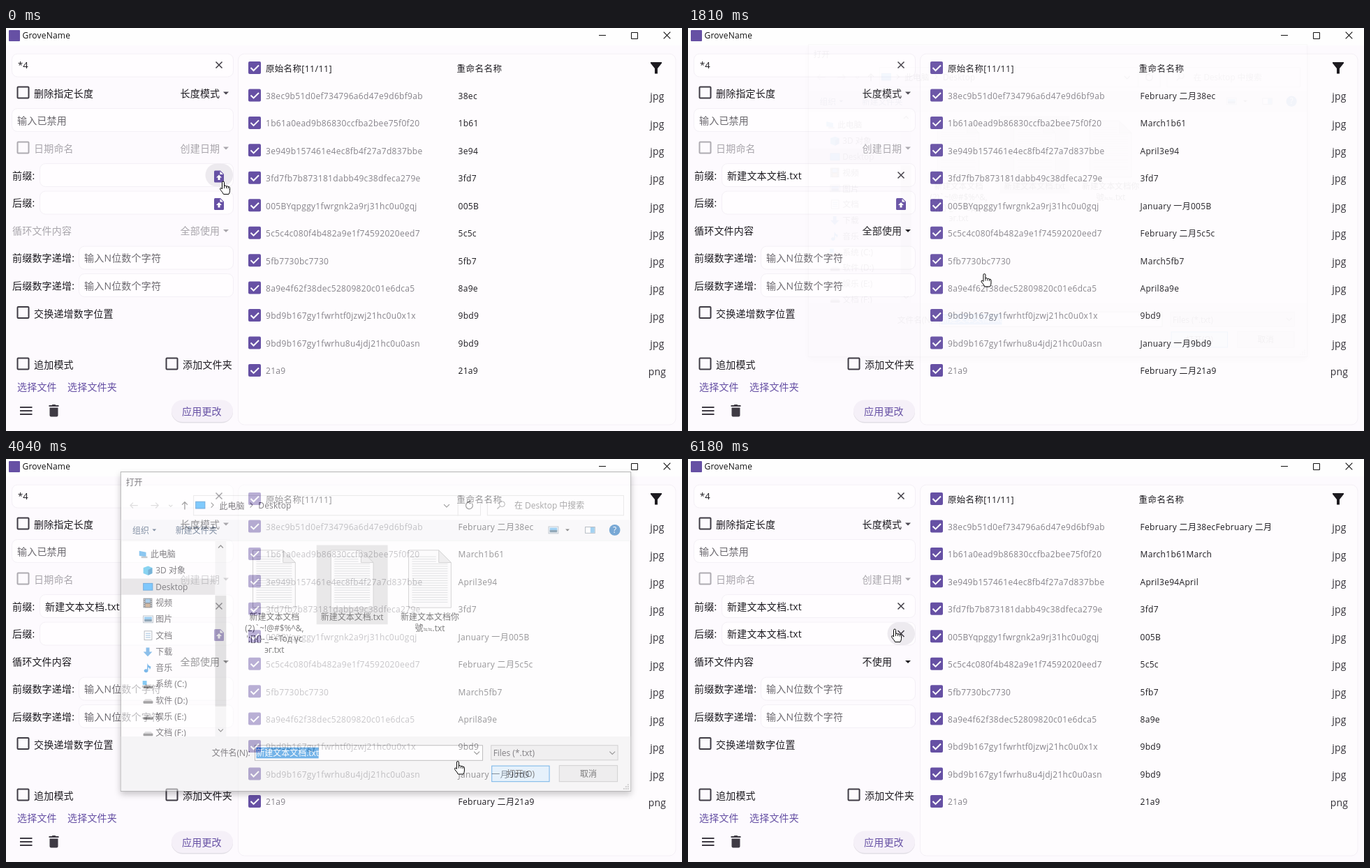
Recreate the animation shown at these times as an HTML page. Size 968x578 px, loop 7.17 s.

```html
<!DOCTYPE html>
<html lang="zh-CN">
<head>
<meta charset="utf-8">
<style>
html, body { margin: 0; width: 100%; height: 100%; overflow: hidden; background: #fdfbfe; }
svg { display: block; width: 968px; height: 578px; cursor: default; }
text { font-family: "Open Sans", "Noto Sans CJK SC", "Noto Sans CJK", sans-serif; white-space: pre; }
</style>
</head>
<body>
<svg id="stage" viewBox="0 0 968 578" xmlns="http://www.w3.org/2000/svg"></svg>
<script>
const LOOP = 7170;
const PURPLE = '#6650a4', INK = '#1d1b20', FAINT = '#a9a6ac', HINT = '#6b686e', BLUE = '#0078d7';
const $ = id => document.getElementById(id);

// Markup helpers; text is placed by its vertical centre.
const text = (x, cy, s, { size = 14, fill = INK, ls = 0.2, anchor = 'start', id = '' } = {}) =>
  `<text x="${x}" y="${cy + size * 0.37}" font-size="${size}" fill="${fill}" letter-spacing="${ls}" text-anchor="${anchor}"${id && ` id="${id}"`}>${s}</text>`;
const rect = (x, y, w, h, fill, extra = '') =>
  `<rect x="${x}" y="${y}" width="${w}" height="${h}" fill="${fill}" ${extra}/>`;
const line = (d, color, w = 1, extra = '') =>
  `<path d="${d}" fill="none" stroke="${color}" stroke-width="${w}" ${extra}/>`;
const shape = (d, fill, extra = '') => `<path d="${d}" fill="${fill}" ${extra}/>`;
const group = (id, body, extra = '') => `<g id="${id}" ${extra}>${body}</g>`;

const cross = (x, y, r, color, w) =>
  line(`M${x - r} ${y - r}l${2 * r} ${2 * r}m0 ${-2 * r}l${-2 * r} ${2 * r}`, color, w);
const caret = (x, y, color = '#49454f', r = 4) => shape(`M${x - r} ${y - r / 2}h${2 * r}l${-r} ${r}z`, color);
const chevron = (x, y, color = '#444', r = 4) => line(`M${x - r} ${y - r / 2}l${r} ${r}l${r} ${-r}`, color, 1.1);
const chevronRight = (x, y) => line(`M${x - 2} ${y - 3.5}l3.5 3.5l-3.5 3.5`, '#555', 1.1);
const field = (x, y, w) => rect(x + 0.5, y + 0.5, w, 33, '#fffdff', 'rx="8" stroke="#f4f0f6"');
const emptyBox = (x, y, color = '#3f3b44') =>
  rect(x - 8, y - 8, 16, 16, 'none', `rx="1" stroke="${color}" stroke-width="2"`);
const checkedBox = (x, y) => rect(x - 9, y - 9, 18, 18, PURPLE, 'rx="2"') +
  line(`M${x - 5.5} ${y}l4 4l7.5 -7.5`, '#fff', 2);
const upload = (x, y) =>
  shape(`M${x - 7} ${y - 7}q0 -1.5 1.5 -1.5h7.5l5 5v10.500q0 1.500 -1.500 1.500h-11q-1.500 0 -1.500 -1.500z`, PURPLE) +
  shape(`M${x + 1.5} ${y - 7.5}v4.500h4.500z`, '#fff') +
  shape(`M${x} ${y - 2.5}l4 4h-2.500v3.500h-3v-3.500h-2.500z`, '#fff');

const stems = ['38ec9b51d0ef734796a6d47e9d6bf9ab', '1b61a0ead9b86830ccfba2bee75f0f20',
  '3e949b157461e4ec8fb4f27a7d837bbe', '3fd7fb7b873181dabb49c38dfeca279e',
  '005BYqpggy1fwrgnk2a9rj31hc0u0gqj', '5c5c4c080f4b482a9e1f74592020eed7', '5fb7730bc7730',
  '8a9e4f62f38dec52809820c01e6dca5', '9bd9b167gy1fwrhtf0jzwj21hc0u0x1x',
  '9bd9b167gy1fwrhu8u4jdj21hc0u0asn', '21a9'];
const months = ['February 二月', 'March', 'April', '', 'January 一月'];

function mainWindow() {
  let s = rect(0, 0, 968, 578, '#fdfafe') + rect(0, 0, 968, 25, '#fefefe') +
    rect(4, 3, 16, 16, PURPLE, 'rx="1"') +
    group('titleBar', text(23.5, 11, 'GroveName', { size: 12, fill: 'currentColor' }) +
      line('M849 10.500h10M895.500 6.500h9v9h-9z', 'currentColor') + cross(946.5, 10.5, 4.8, 'currentColor', 1.1));

  s += field(8, 36.5, 317) + text(17, 53, '*4', { size: 13 }) + cross(305, 53, 4.5, '#3f3b44', 1.5) +
    emptyBox(24.5, 92.5) + text(40, 93.5, '删除指定长度') + text(249.5, 93.5, '长度模式') + caret(315, 93.5) +
    field(8, 115, 317) + text(16, 132.5, '输入已禁用', { fill: HINT }) +
    emptyBox(24.5, 171.5, '#aeabb1') + text(40, 172.5, '日期命名', { fill: FAINT }) +
    text(249.5, 172.5, '创建日期', { fill: FAINT }) + caret(315, 172.5, FAINT);

  ['前缀', '后缀'].forEach((label, i) => {
    const y = 211 + i * 39.5;
    s += text(9, y + 0.5, label + ':') + field(48, y - 17, 277) +
      rect(285.5, y - 16.5, 39.5, 33, '#edeaef', `rx="16.500" id="hover${i}"`) +
      group('empty' + i, upload(305, y + 2)) +
      group('filled' + i, text(56, y + 0.5, '新建文本文档.txt') + cross(305, y, 4.5, '#3f3b44', 1.5));
    const ny = 330 + i * 39.5;
    s += text(9, ny, label + '数字递增:') + field(104, ny - 17.5, 221) +
      text(112, ny, '输入N位数个字符', { fill: HINT });
  });

  s += group('cycle', text(9, 291, '循环文件内容', { fill: 'currentColor' }) +
      text(249.5, 291, '全部使用', { fill: 'currentColor', id: 'cycleValue' }) + caret(315, 291, 'currentColor')) +
    emptyBox(24.5, 408) + text(40, 409.5, '交换递增数字位置') +
    emptyBox(24.5, 481.5) + text(40, 483, '追加模式') + emptyBox(237.5, 481.5) + text(253, 483, '添加文件夹') +
    text(16, 514.5, '选择文件', { fill: PURPLE }) + text(88, 514.5, '选择文件夹', { fill: PURPLE }) +
    line('M20 544h17.500m-17.500 5h17.500m-17.500 5h17.500', '#3f3b44', 1.8) +
    shape('M61.500 541h4l1 -1h4l1 1h4v2h-14zM62.500 544.500h12v11q0 2 -2 2h-8q-2 0 -2 -2z', '#3f3b44') +
    rect(237, 534.5, 88, 32, '#d9d5dd', 'rx="16" opacity=".75"') +
    rect(237, 533.5, 88, 31.5, '#f5f0f8', 'rx="15.750"') + text(252, 549.8, '应用更改', { fill: PURPLE });

  s += rect(332.5, 37, 626.5, 532, '#fefcfe', 'rx="9" stroke="#f4f0f6"') + checkedBox(356, 57) +
    text(372, 58, '原始名称[11/11]', { size: 12.5, ls: 0.31 }) +
    text(645.5, 58, '重命名名称', { size: 12.5, ls: 0.5 }) +
    shape('M923 49h16v1.500l-6 7.500v7.500h-4v-7.500l-6 -7.500z', INK);
  stems.forEach((stem, i) => {
    const y = 57 + 39.45 * (i + 1);
    s += checkedBox(356, y) + text(372, y + 1, stem, { size: 12, ls: 0.31, fill: '#86838a' }) +
      text(647.5, y + 1, '', { size: 12, ls: 0.31, id: 'name' + i }) +
      text(932.5, y + 1.5, i === 10 ? 'png' : 'jpg', { anchor: 'middle', fill: '#333037' });
  });
  return s;
}

const screen = (x, y) => rect(x, y, 14.5, 11, '#0a6fc2') + rect(x + 1, y + 1, 12.5, 9, '#18a0fb');
const disk = y => shape(`M190 ${y + 1}l3 -3h8l3 3v3h-14z`, '#c9c9c9') + rect(190, y + 1, 14, 3.5, '#5c5c5c', 'rx="1"');
const picture = (x, y) => rect(x, y - 5, 14, 10, '#fff', 'stroke="#8a9aa8"') +
  rect(x + 1.5, y - 3.5, 11, 4, '#58b1ec') + rect(x + 1.5, y, 11, 3.5, '#39637f');

const tree = [
  ['此电脑', y => shape(`M184 ${y - 5}l10 2v7l-10 -2z`, '#2b9be6') + rect(187, y + 3, 9, 2.5, '#9aa3aa')],
  ['3D 对象', y => shape(`M190 ${y - 4}l7 -2.500l6 2.500v8l-6 3l-7 -3z`, '#29b3e8') +
    shape(`M197 ${y - 1}l6 -3v8l-6 3z`, '#0b78b8')],
  ['Desktop', y => screen(189.5, y - 5.5)],
  ['视频', y => rect(190, y - 7, 13, 14, '#3b4249') + rect(193, y - 6, 7, 5.5, '#69a7d8') + rect(193, y + 1, 7, 5, '#b08256') +
    line(`M191.500 ${y - 6}v13m10 -13v13`, '#fff', 1, 'stroke-dasharray="1.500 1.500"')],
  ['图片', y => picture(190, y)],
  ['文档', y => rect(191.5, y - 6.5, 11, 13, '#fff', 'stroke="#7c8892"') +
    line(`M193.500 ${y - 3}h7m-7 3h7m-7 3h7`, '#4b8fc4')],
  ['下载', y => shape(`M194 ${y - 6}h5v6h4l-6.500 7l-6.500 -7h4z`, '#2f8fdb')],
  ['音乐', y => shape(`M196 ${y - 7}q1 4 5 5q0 3 -2 5q1 -3 -2 -4v5a3 2.500 0 1 1 -1.500 -2z`, '#1283da')],
  ['系统 (C:)', y => disk(y + 2) + rect(189, y - 5, 6, 6, '#22a0ea')],
  ['软件 (D:)', disk], ['娱乐 (E:)', disk], ['文档 (F:)', disk]
];

function fileIcon(cx) {
  let d = '';
  for (let y = 138; y < 208; y += 3.5) d += `M${cx - 26} ${y}h${y < 148 ? 35 : 52}`;
  return shape(`M${cx - 31} 128.500h44l18 18v66h-62z`, '#fbfbfb', 'stroke="#b3b3b3"') +
    line(d, '#c3c6c9', 0.9) + shape(`M${cx + 13} 128.500v18h18z`, '#e4e4e4', 'stroke="#b3b3b3"');
}

function dialogBox() {
  const dt = (x, y, s, o = {}) => text(x, y, s, { size: 12.2, ls: 0, ...o });
  const label = (x, y, s) => dt(x, y, s, { anchor: 'middle', fill: '#111' });
  let s = rect(157, 14, 745, 467, '#fff', 'stroke="#777" filter="url(#shadow)"') +
    dt(164.5, 29, '打开') + group('closeMark', cross(885, 28.5, 4.8, '#222', 1.1)) +
    line('M182 63h-11m4 -4l-4 4l4 4M201 63h11m-4 -4l4 4l-4 4', '#c6c6c6', 1.2) + chevron(230, 63.5, '#bbb', 2.5) +
    line('M250.500 69v-11m-4 4l4 -4l4 4', '#555', 1.3) +
    rect(263.5, 48.5, 419, 29, '#fff', 'stroke="#d9d9d9"') + line('M649.500 48v30', '#d9d9d9') +
    screen(266, 57) + chevronRight(291, 62.5) + dt(301, 63.5, '此电脑') + chevronRight(348, 62.5) +
    dt(358, 63, 'Desktop', { ls: 0.15 }) + chevron(633, 63.5) +
    line('M670 60a5 5 0 1 1 -5 -1.800m0 0l3 -2m-3 2l2.500 2.500', '#555', 1.3) +
    rect(692.5, 48.5, 199, 29, '#fff', 'stroke="#d9d9d9"') +
    '<circle cx="714" cy="61" r="4" fill="none" stroke="#777"/>' + line('M711 64l-4 4', '#777', 1.2) +
    dt(732, 63, '在 Desktop 中搜索', { fill: '#666' }) +
    rect(157.5, 84, 744, 30, '#f5f6f7') + line('M158 114.500h743', '#e9eaeb') +
    dt(174, 99.5, '组织', { fill: '#1e395b' }) + caret(206, 99, '#1e395b', 3) +
    dt(237, 99.5, '新建文件夹', { fill: '#1e395b' }) + picture(782, 99) + caret(809.5, 99, '#333', 3) +
    rect(835.5, 94.5, 14, 9, '#fff', 'stroke="#7c8a96"') + rect(843, 95, 6, 8, '#58aee8') +
    '<circle cx="878.5" cy="99" r="8" fill="#0a64b4"/>' + dt(878.5, 99, '?', { anchor: 'middle', fill: '#fff' });

  s += rect(158, 170, 137, 23.5, '#d9d9d9');
  let branches = '';
  tree.forEach(([name, icon], i) => {
    const y = 134.5 + 23.75 * i;
    branches += icon(y) + dt(i ? 208 : 200.5, y, name);
  });
  s += `<g clip-path="url(#treeClip)">${branches}</g>` + rect(295, 115, 16, 286, '#f0f0f0') + rect(295, 195, 16, 162, '#cdcdcd') +
    line('M299.500 125l3.500 -3.500l3.500 3.500', '#444', 1.4) + chevron(303, 392, '#444', 3.5);

  s += rect(443, 121, 104, 116, '#e5f3ff', 'id="tile"') + [381, 495, 608.5].map(fileIcon).join('') +
    label(381.5, 226, '新建文本文档') + label(381.5, 242, '(2)`~!@#$%^&amp;,') +
    label(381.5, 258, "';[]{}-_=+Тод үс") + label(381.5, 274, 'эг.txt') + label(495, 226, '新建文本文档.txt') +
    label(608.5, 226, '新建文本文档你') + label(608.5, 242, '號<tspan font-size="8">≒≒</tspan>.txt');

  s += rect(157.5, 401, 744, 79.5, '#f0f0f0') + dt(290, 425.5, '文件名(N):') +
    rect(353, 414, 332.5, 22, '#fff', 'id="nameInput"') + chevron(677, 425) +
    group('caretMark', line('M356.500 417v16', '#111')) +
    group('chosen', rect(355, 417, 91, 16, BLUE) + dt(355, 425, '新建文本文档.txt', { fill: '#fff' })) +
    rect(698, 414, 185, 21.5, '#e5e5e5', 'stroke="#adadad"') + dt(701, 425.5, 'Files (*.txt)') + chevron(875, 425) +
    rect(699, 444, 84, 23, '#e1e1e1', `id="openButton" stroke="${BLUE}"`) + label(741, 455.5, '打开(O)') +
    rect(797.5, 443.5, 85, 23.5, '#e1e1e1', 'stroke="#adadad"') + label(840, 455.5, '取消') +
    line('M897 471.500h2m-5 3h2m1 0h2m-8 3h2m1 0h2m1 0h2', '#aaa', 2);
  return s;
}

const options = ['不使用', '全部使用', '前缀使用', '后缀使用'];
const menuBox = () => rect(237, 225, 97, 171, '#fefbff', 'id="menuPanel" rx="3" filter="url(#menuShadow)"') +
  group('menuItems', rect(237, 271.5, 97, 39.5, '#e6e2e9') +
    options.map((s, i) => text(249.5, 251.5 + 39.5 * i, s)).join(''), 'clip-path="url(#menuClip)"');

const arrowCursor = shape('M0 0v13.500l3.200 -3l2.300 5l2 -.900l-2.200 -4.900h4.400z', '#fff', 'stroke="#000"');
const handCursor = shape('M-1.500 1.500q0 -1.500 1.500 -1.500t1.500 1.500v5q2.500 -1.300 3 .6q2 -.9 2.700 .6q2.300 -.5 2.300 1.700v4q0 2.500 -1.500 5h-7.500q-1.500 -3 -4.200 -6q-1.500 -2 -.2 -2.800q1.300 -.4 2.400 1.400z',
  '#fff', 'stroke="#000"') + line('M1.500 6v4m3 -3v3m2.700 -2.500v3', '#000', 0.9);

$('stage').innerHTML = `<defs>
  <filter id="shadow" x="-10%" y="-10%" width="120%" height="120%"><feDropShadow dx="0" dy="4" stdDeviation="5" flood-color="#000" flood-opacity=".4"/></filter>
  <filter id="menuShadow" x="-30%" y="-30%" width="160%" height="160%"><feDropShadow dx="0" dy="3" stdDeviation="4" flood-color="#000" flood-opacity=".3"/></filter>
  <clipPath id="treeClip"><rect x="158" y="115" width="137" height="286"/></clipPath>
  <clipPath id="menuClip"><rect id="menuWindow" x="237" y="225" width="97" height="171"/></clipPath></defs>` +
  mainWindow() + group('menu', menuBox()) + group('dialog', dialogBox()) +
  group('arrow', arrowCursor) + group('hand', handCursor);

// Pointer path: time, x, y.
const path = [[60, 311, 220], [200, 316, 224], [400, 420, 212], [600, 490, 204], [800, 518, 197], [1000, 510, 192],
  [1100, 530, 230], [1400, 706, 447], [1610, 700, 449], [1810, 425, 353], [2000, 325, 272], [2150, 306, 246],
  [2340, 306, 246], [2680, 488, 202], [3080, 488, 202], [3350, 494, 194], [3480, 500, 205], [3850, 708, 447],
  [3970, 702, 447], [4040, 648, 434], [4300, 362, 330], [4370, 323, 311], [4430, 306, 296], [4500, 292, 286],
  [4800, 292, 286], [5200, 256, 292], [5640, 256, 292], [5840, 296, 244]];
// Each session: blur of main window, fade in, file picked, fade out, list updated.
const sessions = [
  { blur: 130, open: 460, pick: 1060, close: 1620, done: 1740 },
  { blur: 2300, open: 2880, pick: 3420, close: 3950, done: 4100 }
];
const MENU_OPEN = 4770, MENU_CLOSE = 5950;
// Without cycling, only this many rows receive file content.
const FILE_ROWS = 3;

const clamp = v => Math.max(0, Math.min(1, v));
const progress = (t, start, length) => clamp((t - start) / length);
const show = (id, on) => $(id).setAttribute('display', on ? 'inline' : 'none');
const set = (id, attrs) => { for (const k in attrs) $(id).setAttribute(k, attrs[k]); };

function pointer(t) {
  const i = path.findIndex(p => p[0] > t);
  if (i === 0) return path[0].slice(1);
  if (i < 0) return path[path.length - 1].slice(1);
  const [a, b] = [path[i - 1], path[i]], k = progress(t, a[0], b[0] - a[0]);
  return [a[1] + (b[1] - a[1]) * k, a[2] + (b[2] - a[2]) * k];
}
const inside = ([x, y], x0, y0, x1, y1) => x >= x0 && x <= x1 && y >= y0 && y <= y1;

function drawDialog(t, p) {
  const s = sessions.find(s => t >= s.open && t < s.close + 200);
  show('dialog', s);
  if (!s) return;
  const enter = 1 - (1 - progress(t, s.open, 250)) ** 2, leave = progress(t, s.close, 200);
  const scale = 1 - 0.08 * (1 - enter) - 0.043 * leave;
  set('dialog', {
    opacity: enter * (1 - leave),
    transform: `translate(529.5 247.5) scale(${scale}) translate(-529.5 -247.5)`
  });
  const picked = t >= s.pick, closing = t >= s.close, hovered = inside(p, 443, 121, 547, 237);
  const pressed = closing || inside(p, 698, 443, 784, 468);
  set('tile', { fill: picked ? (hovered ? '#cce8ff' : '#d9d9d9') : hovered ? '#e5f3ff' : 'none' });
  set('openButton', { fill: pressed ? '#d3e9fa' : '#e1e1e1', 'stroke-width': pressed ? 1 : 2 });
  set('nameInput', { stroke: closing ? '#8a8a8a' : BLUE });
  show('closeMark', !closing);
  show('chosen', picked);
  show('caretMark', !picked);
}

function drawMenu(t) {
  const on = t >= MENU_OPEN && t < MENU_CLOSE + 210;
  show('menu', on);
  if (!on) return;
  const grow = 1 - (1 - progress(t, MENU_OPEN, 330)) ** 3;
  const y = 271.5 - 46.5 * grow, height = 39.5 + 131.5 * grow;
  set('menuPanel', { y, height });
  set('menuWindow', { y, height });
  set('menu', { opacity: progress(t, MENU_OPEN - 30, 100) * (1 - progress(t, MENU_CLOSE, 210)) });
}

function draw(t) {
  const p = pointer(t);
  const active = !sessions.some(s => t >= s.blur && t < s.close);
  const done = sessions.map(s => t >= s.done), unused = t >= MENU_CLOSE + 30;
  const menuUp = t >= MENU_OPEN && t < MENU_CLOSE + 150;

  $('titleBar').style.color = active ? '#111' : '#999';
  $('cycle').style.color = done[0] ? INK : FAINT;
  $('cycleValue').textContent = unused ? options[0] : options[1];
  done.forEach((filled, i) => {
    const y = 194.5 + 39.5 * i;
    show('filled' + i, filled);
    show('empty' + i, !filled);
    show('hover' + i, active && !menuUp && inside(p, 285, y, 325, y + 33));
  });
  stems.forEach((stem, i) => {
    const month = unused && i >= FILE_ROWS ? '' : months[i % months.length];
    $('name' + i).textContent = (done[0] ? month : '') + stem.slice(0, 4) + (done[1] ? month : '');
  });
  drawDialog(t, p);
  drawMenu(t);

  const hand = active && (p[0] > 338 || (p[0] > 248 && p[0] < 322));
  show('hand', hand);
  show('arrow', !hand);
  set(hand ? 'hand' : 'arrow', { transform: `translate(${p[0]} ${p[1]})` });
}

const start = performance.now();
function frame() {
  draw((performance.now() - start) % LOOP);
  requestAnimationFrame(frame);
}
frame();
</script>
</body>
</html>
```
